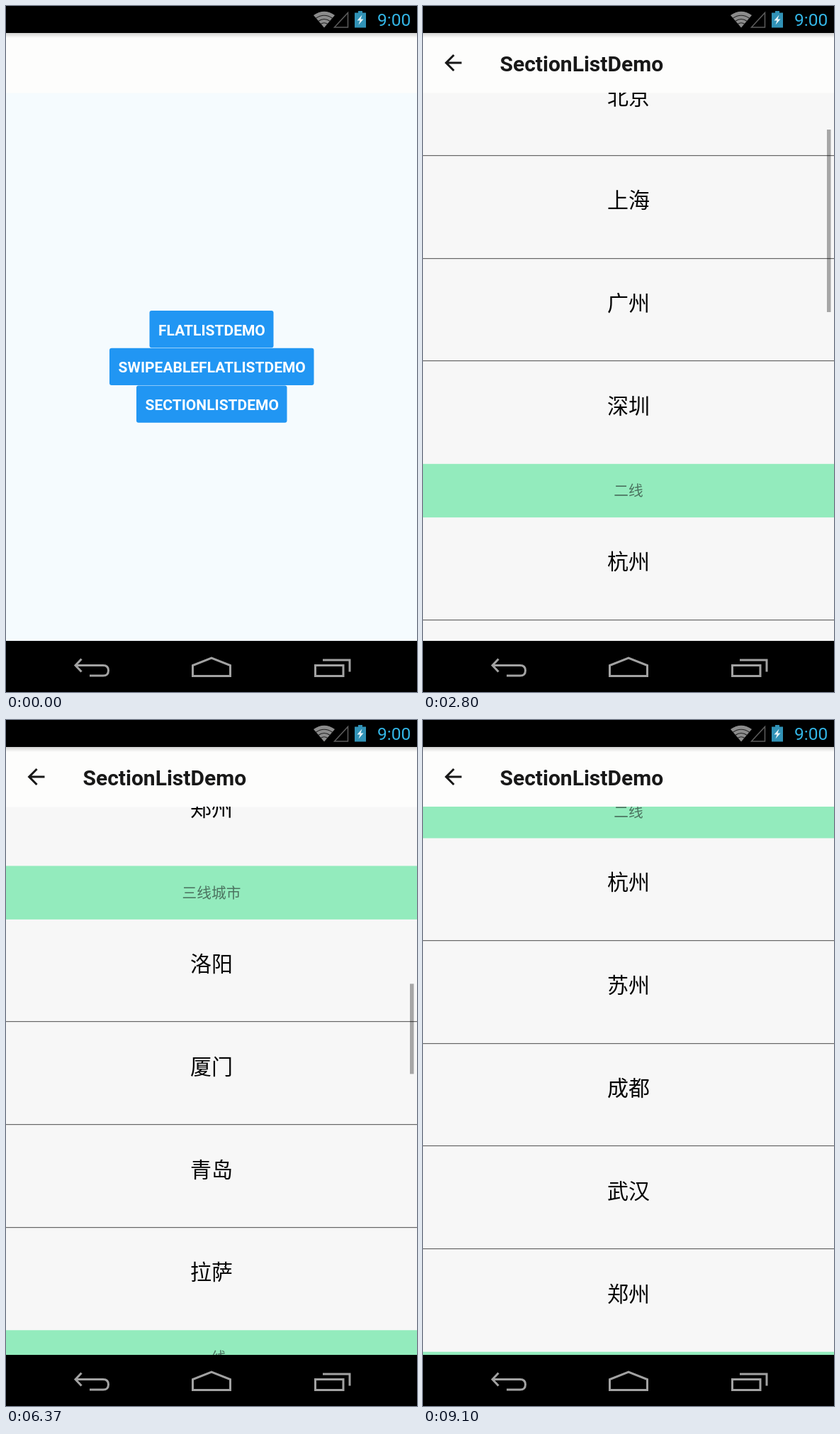
Recreate the animation shown at these times as an HTML page. Size 580 by 966 pixels, loop 9130 ms.

```html
<!DOCTYPE html>
<html lang="zh-CN">
<head>
<meta charset="utf-8">
<style>
html, body { margin: 0; width: 100%; height: 100%; overflow: hidden; background: #000; }
svg { display: block; width: 580px; height: 966px; }
text { font-family: Roboto, "Noto Sans CJK SC", "Noto Sans CJK", sans-serif; }
.btn, .title { font-weight: 700; }
.btn { font-size: 21px; fill: #fff; text-anchor: middle; }
.title { font-size: 30px; fill: #181818; }
.city, .tier { font-family: "Noto Sans CJK SC", "Noto Sans CJK", sans-serif; text-anchor: middle; }
.city { font-size: 30px; fill: #050505; }
.tier { font-size: 20.7px; fill: #4c7360; }
</style>
</head>
<body>
<svg viewBox="0 0 580 966">
  <defs>
    <clipPath id="listClip"><rect y="122" width="580" height="773"/></clipPath>
    <linearGradient id="shade" x2="0" y2="1">
      <stop offset="0" stop-opacity=".17"/>
      <stop offset="1" stop-opacity="0"/>
    </linearGradient>
  </defs>

  <rect y="38" width="580" height="856" fill="#f5fbfe"/>
  <rect y="38" width="580" height="84.5" fill="#fdfdfc"/>
  <g id="buttons"></g>

  <g id="page">
    <g class="back">
      <rect y="122" width="580" height="773" fill="#f7f7f7"/>
      <rect y="38" width="580" height="84.5" fill="#fdfdfc"/>
    </g>
    <g class="front">
      <g clip-path="url(#listClip)">
        <g id="rows"></g>
        <rect id="thumb" x="570" width="5.5" fill="#000" fill-opacity=".33"/>
      </g>
      <path transform="translate(24.5 62) scale(1.5)" fill="#181818"
        d="M20 11H7.83l5.59-5.59L12 4l-8 8 8 8 1.41-1.41L7.83 13H20z"/>
      <text class="title" x="108.5" y="92">SectionListDemo</text>
    </g>
  </g>

  <rect y="38" width="580" height="7" fill="url(#shade)"/>
  <rect width="580" height="38" fill="#000"/>
  <rect y="894" width="580" height="72" fill="#000"/>

  <!-- status icons -->
  <path d="M449 30.500L434 13Q449 2.500 464 13Z" fill="#8c8c8c"/>
  <path d="M437 17.500Q449 9 461 17.500M440.500 21.500Q449 15.500 457.500 21.500M444 25.500Q449 22 454 25.500"
    fill="none" stroke="#222" stroke-width="1.2"/>
  <path d="M482.500 9.500V30H463.500Z" fill="none" stroke="#5c5c5c" stroke-width="1.500"/>
  <path d="M497 7h6v2.500h5V30.500H492V9.500h5z" fill="#3192b6"/>
  <path d="M502.500 12.500L495.500 20.500H499.500L497.500 26.500L504.500 18.500H500.500Z" fill="#e8f4f8"/>
  <text x="524" y="28" font-size="24.500" fill="#33b5e5">9:00</text>

  <!-- navigation icons -->
  <g fill="none" stroke="#a2a2a2" stroke-width="3">
    <path d="M106.500 919.500L98 928.500L106.500 937.500M98 928.500H137Q144.500 928.500 144.500 935.800T137 943H118"/>
    <path d="M263.500 943.500V928.500L290 918L316.500 928.500V943.500Z"/>
    <path d="M436.500 928.500H476V943.500H436.500ZM447 921H485V937.500"/>
  </g>
</svg>
<script>
const LOOP = 9130, TOP = 122, ITEM = 143.85, TIER = 75.4;
const el = id => document.getElementById(id);
const clamp = v => Math.max(0, Math.min(1, v));
const page = el("page"), thumb = el("thumb");
const back = page.querySelector(".back"), front = page.querySelector(".front");

const buttons = [
  ["FLATLISTDEMO", 202.5, 175, 429],
  ["SWIPEABLEFLATLISTDEMO", 146, 288.5, 481.7],
  ["SECTIONLISTDEMO", 184, 212.5, 534.4]
];
el("buttons").innerHTML = buttons.map(([s, x, w, y]) =>
  `<rect x="${x}" y="${y}" width="${w}" height="52.3" rx="3" fill="#2196f3"/>
   <text class="btn" x="${x + w / 2 + 0.5}" y="${y + 34.5}">${s}</text>`).join("");

const sections = [
  ["一线", "北京 上海 广州 深圳"],
  ["二线", "杭州 苏州 成都 武汉 郑州"],
  ["三线城市", "洛阳 厦门 青岛 拉萨"]
];

function buildRows() {
  let y = 0, out = "";
  for (const [tier, list] of [...sections, ...sections]) {
    out += `<rect y="${y}" width="580" height="${TIER}" fill="#93ebbd"/>
      <text class="tier" x="290" y="${y + 45.6}">${tier}</text>`;
    y += TIER;
    list.split(" ").forEach((city, i, all) => {
      out += `<text class="city" x="290" y="${y + 73}">${city}</text>`;
      y += ITEM;
      if (i < all.length - 1) {
        out += `<rect y="${Math.floor(y)}" width="580" height="1.2" fill="#666"/>`;
        y += 1;
      }
    });
  }
  el("rows").innerHTML = out;
}
buildRows();

// Scroll path: [time, offset]
const path = [
  [2350, 0], [2800, 131], [3170, 300], [4230, 300], [4670, 452], [5170, 700],
  [5700, 900], [6100, 1080], [6370, 1368], [6700, 1950], [6970, 2381],
  [7570, 2520], [7770, 2520], [8430, 2791]
];
const slope = i => (path[i + 1][1] - path[i][1]) / (path[i + 1][0] - path[i][0]);
// harmonic mean of neighbouring slopes keeps the curve monotone
function tangent(i) {
  if (i === 0 || i === path.length - 1) return 0;
  const a = slope(i - 1), b = slope(i);
  return a * b > 0 ? 2 * a * b / (a + b) : 0;
}
function scrollAt(t) {
  if (t <= path[0][0]) return 0;
  const i = path.findIndex(p => p[0] > t) - 1;
  if (i < 0) return path[path.length - 1][1];
  const [t0, y0] = path[i], [t1, y1] = path[i + 1];
  const d = t1 - t0, u = (t - t0) / d, v = 1 - u;
  return y0 * (1 + 2 * u) * v * v + y1 * u * u * (3 - 2 * u)
    + d * u * v * (v * tangent(i) - u * tangent(i + 1));
}

function thumbAlpha(t) {
  if (t < 4230) return 1 - clamp((t - 3500) / 300);
  return 1 - clamp((t - 8730) / 280);
}

// Fade-in lags behind the slide: slow at first, then faster
function fade(p) {
  if (p < 0.5) return p / 2;
  if (p < 0.9) return 0.25 + (p - 0.5) * 1.125;
  return 0.7 + (p - 0.9) * 3;
}

function draw(t) {
  const p = 1 - Math.pow(1 - clamp((t - 1600) / 350), 5), a = fade(p);
  page.setAttribute("transform", `translate(0 ${75 * (1 - p)})`);
  front.setAttribute("opacity", a);
  // two stacked translucent backgrounds
  back.setAttribute("opacity", 1 - (1 - a) ** 2);

  const y = scrollAt(t);
  el("rows").setAttribute("transform", `translate(0 ${Math.round(TOP - y)})`);

  // the thumb shrinks as more rows get loaded
  const [size, rate] = t < 2500 ? [456, 0.59] : t < 3000 ? [257, 0.358] : [127, 0.1785];
  thumb.setAttribute("y", 127 + y * rate);
  thumb.setAttribute("height", size);
  thumb.setAttribute("opacity", thumbAlpha(t));
}

const start = performance.now();
function tick() {
  draw((performance.now() - start) % LOOP);
  requestAnimationFrame(tick);
}
tick();
</script>
</body>
</html>
```
